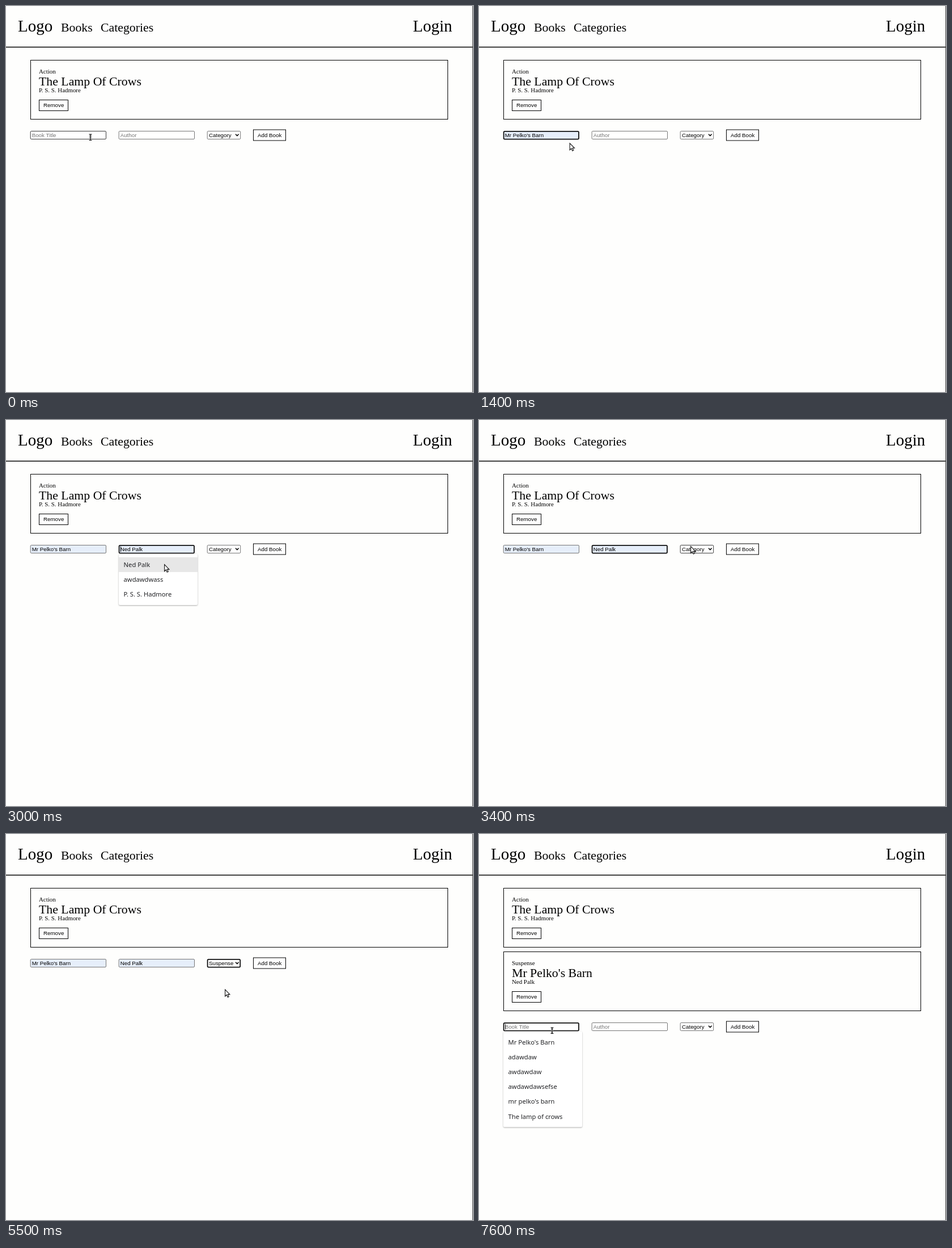
Write an HTML page that moves like this. It is 824x680 px and loops after 8000 ms.

```html
<!DOCTYPE html>
<html lang="en">
<head>
<meta charset="utf-8">
<title>Book list</title>
<style>
  html, body { margin: 0; width: 100%; height: 100%; overflow: hidden; background: #fefefd; }
  svg { display: block; }
  text { white-space: pre; }
  .serif { font-family: "Liberation Serif", "Times New Roman", serif; }
  .ui { font: 9.75px "Liberation Sans", Arial, sans-serif; }
  .list { font: 500 11.2px "Noto Sans", "Open Sans", sans-serif; fill: #202124; }
  .menu { filter: drop-shadow(0 1px 1.2px rgba(0, 0, 0, .32)); }
  .popup { filter: drop-shadow(0 2px 3px rgba(0, 0, 0, .3)); }
</style>
</head>
<body>
<svg id="stage" width="824" height="680" viewBox="0 0 824 680"></svg>
<script>
const stage = document.getElementById('stage');
const LOOP = 8000, STEP = 100, ROW = 26.1, SHIFT = 112;

const OLD_BOOK = { kind: 'Action', title: 'The Lamp Of Crows', author: 'P. S. S. Hadmore' };
const NEW_BOOK = { kind: 'Suspense', title: "Mr Pelko's Barn", author: 'Ned Palk' };
const TITLES = [NEW_BOOK.title, 'adawdaw', 'awdawdaw', 'awdawdawsefse', "mr pelko's barn", 'The lamp of crows'];
const AUTHORS = [NEW_BOOK.author, 'awdawdwass', OLD_BOOK.author];
const KINDS = ['Category', 'Fiction', 'Action', 'Suspense', 'Romance'];

// Pointer moves: first step, last step, destination.
const MOVES = [
  [800, 1000, 144, 244], [1400, 1800, 222, 230], [2000, 2000, 224, 230],
  [2100, 2200, 262, 250], [2600, 2800, 293, 262], [2900, 3000, 279, 254],
  [3400, 3400, 373, 222], [3800, 3800, 381, 226], [4000, 4100, 386, 255],
  [4600, 4700, 386, 258], [5100, 5100, 386, 276], [5500, 5500, 386, 273.5],
  [5600, 6000, 443, 230], [7100, 7400, 129, 346]
];

const rect = (x, y, w, h, fill, stroke = 'none', sw = 1, r = 0) =>
  `<rect x="${x}" y="${y}" width="${w}" height="${h}" rx="${r}" fill="${fill}" stroke="${stroke}" stroke-width="${sw}"/>`;
const text = (x, y, s, cls = 'ui', fill = '#000') =>
  `<text x="${x}" y="${y}" class="${cls}" fill="${fill}">${s}</text>`;
const serif = (x, y, size, s) =>
  `<text x="${x}" y="${y}" class="serif" font-size="${size}">${s}</text>`;
const group = (dy, body) => `<g transform="translate(0 ${dy})">${body}</g>`;

const button = (x, y, w, label) =>
  rect(x + .5, y + .5, w - 1, 19, '#fff', '#000') + text(x + 8, y + 13.2, label);

const header = () =>
  serif(21, 45, 29, 'Logo') + serif(97, 45, 21.8, 'Books') +
  serif(167, 45, 21.8, 'Categories') + serif(718, 45, 29, 'Login') +
  rect(0, 71.7, 824, 1.5, '#000') + rect(823, 0, 1, 680, '#444');

const card = (book, dy) => group(dy,
  rect(43.5, 95.5, 736, 104, 'none', '#000') +
  serif(58, 119.3, 10.9, book.kind) + serif(58, 139.6, 21.8, book.title) +
  serif(58, 151.8, 10.9, book.author) + button(58, 165, 52, 'Remove'));

function frame(x, w, fill, focus, hover) {
  return focus
    ? rect(x + .6, 220.8, w - .9, 13.8, fill, '#101010', 1.8, 1.8)
    : rect(x + .2, 220.5, w, 14, fill, hover ? '#3c3c3c' : '#767676', 1, 1.5);
}

function input(x, hint, value, focus, hover, caret) {
  return frame(x, 133.3, value ? '#e6eefa' : '#fff', focus, hover) +
    text(x + 2.7, 231, value || hint, 'ui', value ? '#000' : '#757575') +
    (caret ? rect(x + 3, 222.5, .8, 10, '#000') : '');
}

function select(value, focus, hover) {
  return frame(355, 58.5, '#fff', focus, hover) + text(358, 231, value) +
    '<path d="M405 225.8l2.8 2.8 2.8-2.8" fill="none" stroke="#000" stroke-width="1.5"/>';
}

function menu(x, items, active) {
  const rows = items.map((s, i) => text(x + 8.6, 259 + i * ROW, s, 'list')).join('');
  return `<g class="menu">${rect(x, 235.7, 139, items.length * ROW + 12, '#fff', 'none', 0, 2)}</g>` +
    (active ? rect(x, 241.7, 139, ROW, '#e7e7e7') : '') + rows;
}

function popup(active) {
  const rows = KINDS.map((s, i) =>
    (i === active ? rect(355.5, 235 + i * 12, 58, 12, '#1e90f5') : '') +
    text(358.3, 244.4 + i * 12, s, 'ui', i === active ? '#fff' : i ? '#000' : '#808080')).join('');
  return `<g class="popup">${rect(355.2, 234.8, 58.5, 61, '#f5f5f5', '#767676')}</g>` + rows;
}

function pointer(t) {
  let x = 149, y = 231;
  for (const [from, to, toX, toY] of MOVES) {
    if (t < from) break;
    const p = Math.min(1, (t - from + STEP) / (to - from + STEP));
    x += (toX - x) * p;
    y += (toY - y) * p;
  }
  const beam = t < 800 || (t >= 1700 && t < 2000) || t >= 7400;
  const shape = beam
    ? '<path d="M-2.5-5H2.5M-2.5 5.5H2.5M0-5V5.5" fill="none" stroke="#fff" stroke-width="3.4"/>' +
      '<path d="M-2.5-5H2.5M-2.5 5.5H2.5M-.8-5V5.5M.8-5V5.5" fill="none" stroke="#111" stroke-width="1"/>'
    : '<path d="M.6.6V12.4L3.3 9.8 5.2 14 7.2 13.1 5.4 9.1H8.9Z" fill="#fff" stroke="#111" stroke-width="1.1"/>';
  return `<g transform="translate(${x} ${y})">${shape}</g>`;
}

function scene(t) {
  const within = (a, b) => t >= a && t < b;
  const added = t >= 6800, again = t >= 7600;
  const title = within(900, 6200) && NEW_BOOK.title;
  const author = within(2100, 6200) && NEW_BOOK.author;
  const kind = within(5500, 6200) ? NEW_BOOK.kind : 'Category';
  const choice = t < 4000 ? -1 : t < 4600 ? 1 : t < 5100 ? 2 : 3;

  const form =
    input(43, 'Book Title', title, within(400, 1800) || again, t < 400 || t >= 7400, within(400, 900) || again) +
    input(199, 'Author', author, within(1800, 3600), false, within(1800, 2400) || within(2900, 3200)) +
    select(kind, within(5500, 6200), within(3400, 3600)) +
    button(436, 217.5, 58, 'Add Book') +
    (within(400, 1300) || again ? menu(43, TITLES, within(900, 1300)) : '') +
    (within(1800, 3200) ? menu(199, AUTHORS, t >= 2100) : '') +
    (within(3600, 5500) ? popup(choice) : '');

  return header() + card(OLD_BOOK, 0) + (added ? card(NEW_BOOK, SHIFT) : '') +
    group(added ? SHIFT : 0, form) + pointer(t);
}

let shown = -1;
const start = performance.now();
function draw() {
  const t = Math.floor((performance.now() - start) % LOOP / STEP) * STEP;
  if (t !== shown) stage.innerHTML = scene(shown = t);
  requestAnimationFrame(draw);
}
draw();
</script>
</body>
</html>
```
